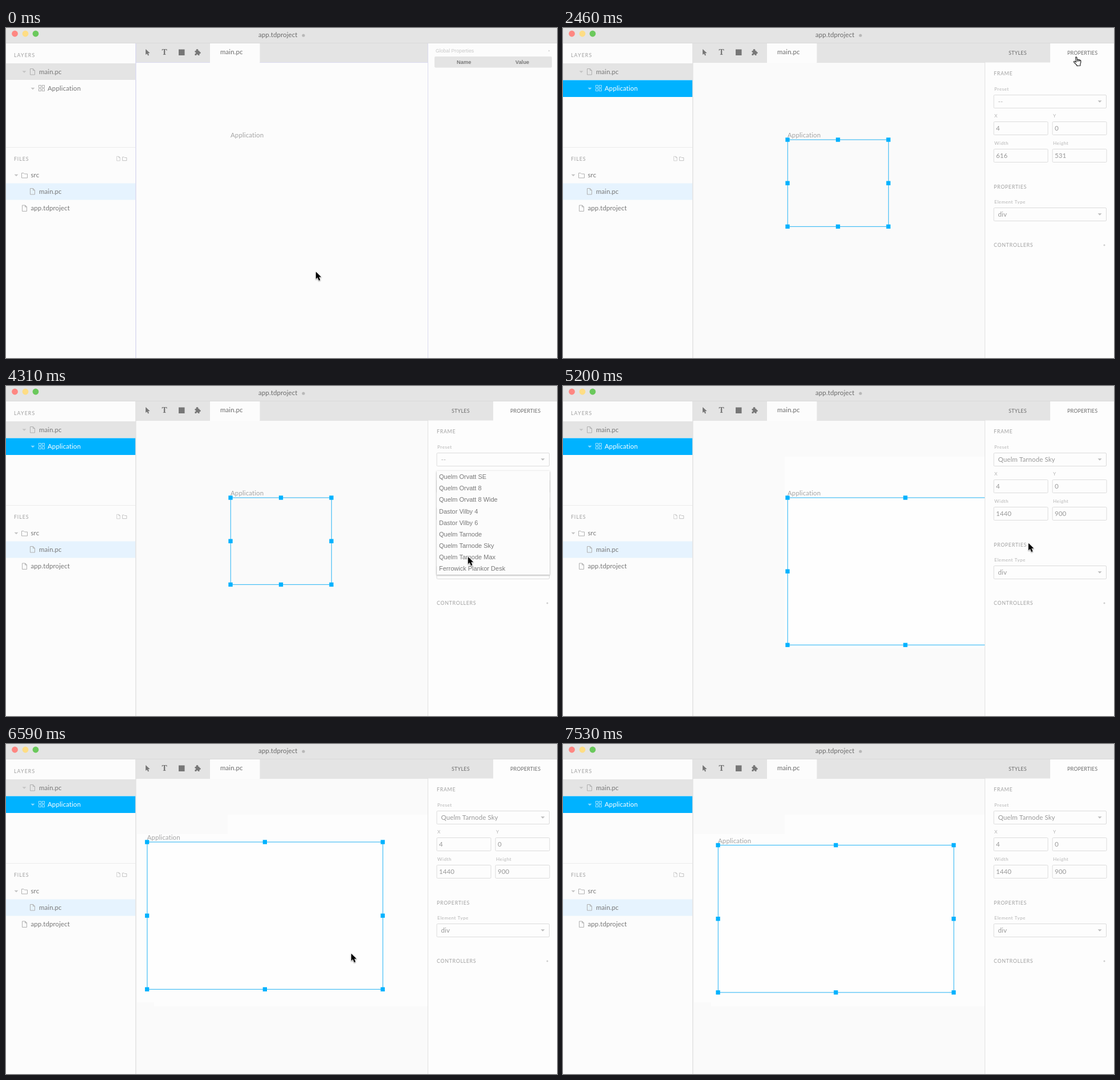
An HTML page with a canvas that plays this animation: 967 by 579 pixels, repeating every 8.27 s.

```html
<!DOCTYPE html>
<html lang="en">
<head>
<meta charset="utf-8">
<title>Frame presets</title>
<style>
  html, body { margin: 0; width: 100%; height: 100%; overflow: hidden; background: #fcfcfc; }
  canvas { display: block; }
</style>
</head>
<body>
<canvas id="stage" width="967" height="579"></canvas>
<script>
const ctx = document.getElementById('stage').getContext('2d');
const LOOP = 8270, BLUE = '#00b2ff', GREY = '#e4e4e4', INK = '#777', PALE = '#b4b4b4';
const SELECT = 1070, PROPERTIES = 2370, OPEN = 3240, CHOOSE = 5200, PAN = 6030, SETTLE = 6890, HIDE = 7530;
const LATO = 'Lato, sans-serif', ARIAL = '"Liberation Sans", Arial, sans-serif';
const presets = ['Quelm Orvatt SE', 'Quelm Orvatt 8', 'Quelm Orvatt 8 Wide', 'Dastor Vilby 4', 'Dastor Vilby 6',
  'Quelm Tarnode', 'Quelm Tarnode Sky', 'Quelm Tarnode Max', 'Ferrowick Plankor Desk'];

// Pointer moves: first step, last step, number of steps, destination.
const moves = [
  [240, 590, 5, 521, 277], [1340, 1340, 1, 566, 245], [1480, 1840, 5, 890, 58],
  [2110, 2200, 2, 895, 51], [2760, 3120, 5, 841, 130], [3600, 3600, 1, 835, 147],
  [3690, 4310, 8, 810, 300], [4670, 4930, 4, 816, 276], [5560, 5560, 1, 834, 286],
  [5660, 5750, 2, 650, 389], [5850, 5850, 1, 605, 368], [7410, 7410, 1, 635, 399]
];
const panPath = [[-18, -1], [-55, -3], [-95, -4], [-130, -6], [-155, -13], [-160, -20], [-146.5, -24], [-122, -14], [-104, 0]];

function stepsDone(t, first, last, count) {
  if (t < first) return 0;
  if (t >= last) return count;
  return Math.floor((t - first) / (last - first) * (count - 1)) + 1;
}

function pointerAt(t) {
  let x = 543, y = 428;
  for (const [first, last, count, toX, toY] of moves) {
    const p = stepsDone(t, first, last, count) / count, eased = p * p * (3 - 2 * p);
    x += (toX - x) * eased;
    y += (toY - y) * eased;
    if (p < 1) break;
  }
  return [x, y];
}

function panAt(t) {
  const done = stepsDone(t, PAN, 6770, panPath.length);
  if (!done) return [0, 0];
  const [x, y] = panPath[done - 1], p = stepsDone(t, SETTLE, 7230, 4) / 4;
  return [x + (-122 - x) * p, y + (-18.5 - y) * p];
}

function fill(x, y, w, h, color) {
  ctx.fillStyle = color;
  ctx.fillRect(x, y, w, h);
}

function text(s, x, y, color = INK, size = 11.5, spacing = 0.1, font = LATO, weight = 400) {
  ctx.font = `${weight} ${size}px ${font}`;
  ctx.letterSpacing = spacing + 'px';
  ctx.fillStyle = color;
  ctx.fillText(s, x, y + size * 0.34);
}

const heading = (s, x, y, spacing = 0.7) => text(s, x, y, '#a0a0a0', 8.8, spacing);
const label = (s, x, y) => text(s, x, y, PALE, 8.2, 0.5);

function polygon(points, x, y, color, outline) {
  ctx.save();
  ctx.translate(x, y);
  ctx.beginPath();
  points.forEach(p => ctx.lineTo(...p));
  ctx.closePath();
  if (outline) { ctx.strokeStyle = outline; ctx.stroke(); }
  if (color) { ctx.fillStyle = color; ctx.fill(); }
  ctx.restore();
}

function disc(x, y, r, color) {
  ctx.fillStyle = color;
  ctx.beginPath();
  ctx.arc(x, y, r, 0, 7);
  ctx.fill();
}

const chevron = (x, y, color = '#c4c4c4', w = 3.5) => polygon([[-w, -w / 2], [w, -w / 2], [0, w / 2]], x, y, color);

function plus(x, y, r, color) {
  fill(x - r, y - 0.5, 2 * r, 1, color);
  fill(x - 0.5, y - r, 1, 2 * r, color);
}

function fileIcon(x, y, scale = 1, color = '#b0b0b0') {
  ctx.save();
  ctx.translate(x, y);
  ctx.scale(scale, scale);
  polygon([[0, 0], [5, 0], [8, 3], [8, 10.5], [0, 10.5]], 0.5, 0.5, null, color);
  polygon([[5, 0], [5, 3], [8, 3]], 0.5, 0.5, null, color);
  ctx.restore();
}

function folderIcon(x, y, scale = 1) {
  ctx.save();
  ctx.translate(x, y);
  ctx.scale(scale, scale);
  polygon([[0, 0], [3.5, 0], [5, 1.5], [10, 1.5], [10, 8.5], [0, 8.5]], 0.5, 0.5, null, '#b0b0b0');
  ctx.restore();
}

function field(x, y, w, value, isSelect, color = '#999') {
  ctx.strokeStyle = '#dcdcdc';
  ctx.beginPath();
  ctx.roundRect(x + 0.5, y + 0.5, w - 1, 23, 1.5);
  ctx.stroke();
  text(value, x + (isSelect ? 8 : 4.5), y + 12, color);
  if (isSelect) chevron(x + w - 12, y + 12, '#bcbcbc');
}

function pair(left, right, y, leftValue, rightValue, isSelect, color) {
  label(left, 757, y);
  label(right, 860, y);
  field(755.5, y + 9.5, 96, leftValue, isSelect, color);
  field(858.5, y + 9.5, 96, rightValue, isSelect, color);
}

function wideSelect(name, y, value, color) {
  label(name, 757, y);
  field(755.5, y + 9.5, 198.5, value, true, color);
}

function drawSidebar(t) {
  const selected = t >= SELECT, line = selected ? '#9be0ff' : '#b0b0b0';
  fill(0, 27, 228, 552, '#fcfcfc');
  heading('LAYERS', 14, 48, 1.1);
  fill(0, 62, 227, 29, GREY);
  chevron(32, 77);
  fileIcon(42, 71);
  text('main.pc', 58, 77);

  if (selected) fill(0, 91.5, 227, 29.5, BLUE);
  else if (t >= 420) fill(0, 91.5, 227, 29.5, GREY);
  chevron(47, 106.5, selected ? '#8adcff' : '#c4c4c4');
  ctx.strokeStyle = line;
  for (const [x, y] of [[57.5, 100.5], [63.5, 100.5], [57.5, 106.5], [63.5, 106.5]]) ctx.strokeRect(x, y, 4, 4);
  text('Application', 73, 106, selected ? '#fff' : INK);

  fill(0, 209, 228, 1, '#ececec');
  heading('FILES', 14, 230, 0.9);
  fileIcon(194, 225, 0.72, '#c0c0c0');
  folderIcon(204, 226, 0.74);
  chevron(18, 258.5);
  folderIcon(27, 254);
  text('src', 43.5, 258);
  fill(0, 272.5, 227, 29, '#e6f3fe');
  fileIcon(42, 281);
  text('main.pc', 58, 287);
  fileIcon(28, 310.5);
  text('app.tdproject', 43.5, 316.5);
}

function drawToolbar(t) {
  fill(0, 0, 967, 27, GREY);
  fill(0, 26, 967, 1, '#dadada');
  disc(15.5, 10, 5.4, '#fe8782');
  disc(34, 10, 5.4, '#fedd85');
  disc(52, 10, 5.4, '#6bc95c');
  text('app.tdproject', 443, 12.5, '#6c6c6c');
  disc(522, 13, 2.6, '#b8b8b8');

  fill(228, 27, 512, 34, GREY);
  polygon([[0, 0], [0, 10], [2.4, 8], [4.2, 11.5], [6, 10.6], [4.4, 7.2], [7.6, 7]], 245, 37, INK);
  text('T', 273.5, 42.5, INK, 14, 0, '"Noto Serif", serif', 700);
  fill(303, 37.5, 10.5, 10.5, INK);
  fill(331.5, 40, 8, 8, INK);
  disc(335.5, 39, 2.1, INK);
  disc(340, 43.5, 1.7, INK);
  disc(332, 43.8, 1.3, GREY);
  disc(335.5, 47.6, 1.3, GREY);
  fill(358, 27, 87.5, 34, '#fcfcfc');
  text('main.pc', 376, 42.5, '#6c6c6c');
  const edge = t < PROPERTIES ? '#dadaf0' : '#e2e2e2';
  fill(227, 27, 1.5, 552, edge);
  fill(228, 60, 130, 1, edge);
  fill(445.5, 60, 295, 1, edge);
  fill(740, 27, 1, 552, edge);
}

function drawArtboard(t) {
  const [dx, dy] = panAt(t), x = 394 + dx, y = 196 + dy;
  const [w, h] = t < CHOOSE ? [177, 152.4] : [413.6, 258.4];
  ctx.save();
  ctx.beginPath();
  ctx.rect(228, 61, 512, 518);
  ctx.clip();
  fill(228, 61, 512, 518, t < PROPERTIES ? '#fcfcfc' : '#fafafa');
  if (t >= CHOOSE) fill(389, 124, 351, 336, '#fdfdfd');
  if (t >= 6300) fill(260, 158, 129, 302, '#fdfdfd');
  if (t >= 6390) fill(230, 158, 30, 295, '#fdfdfd');
  if (t >= CHOOSE) fill(x, y, w, h, '#fefefe');
  text('Application', x, y - 7.5, '#a4a4a4');
  if (t >= 420) {
    ctx.strokeStyle = '#35b9f5';
    ctx.lineWidth = 1.1;
    ctx.strokeRect(x + 0.3, y, w, h);
    ctx.lineWidth = 1;
  }
  if (t >= SELECT) {
    for (const i of [0, 0.5, 1]) for (const j of [0, 0.5, 1])
      if (i !== 0.5 || j !== 0.5) fill(x + i * w - 3.6, y + j * h - 3.7, 7.3, 7.4, BLUE);
  }
  ctx.restore();
}

function drawGlobals() {
  text('Global Properties', 754, 40.5, '#c8c8c8', 8.7, 0, ARIAL);
  plus(953, 40, 1.2, '#d0d0d0');
  ctx.fillStyle = GREY;
  ctx.beginPath();
  ctx.roundRect(752, 50, 206, 19.5, 2);
  ctx.fill();
  text('Name', 791, 60, INK, 9.3, 0, ARIAL, 700);
  text('Value', 894, 60, INK, 9.3, 0, ARIAL, 700);
}

function drawStyles() {
  label('Style', 754, 73.5);
  plus(953.5, 76.5, 2.7, '#777');
  field(752, 89.5, 206, '--', true, PALE);
  fill(741, 121, 226, 1, '#efefef');
  heading('INSTANCE', 756, 141.5);
  heading('MIXINS', 756, 182.5);
  plus(949.5, 182.5, 2.5, '#bbb');
  heading('LAYOUT', 756, 223);
  wideSelect('Display', 249, '--', PALE);
  wideSelect('Position', 295.5, '--', PALE);
  pair('Left', 'Top', 342, '0px', '0px', false, '#d4d4d4');
  pair('Width', 'Height', 388.5, 'auto', 'auto', false, '#d4d4d4');
  heading('TYPOGRAPHY', 756, 463.5);
  wideSelect('Font Family', 489.5, '--', PALE);
  pair('Weight', 'Decoration', 536, '--', '--', true, PALE);
}

function drawProperties(t) {
  const chosen = t >= CHOOSE;
  heading('FRAME', 756, 80.5);
  wideSelect('Preset', 107.5, chosen ? presets[6] : '--', chosen ? '#999' : PALE);
  pair('X', 'Y', 154.5, '4', '0');
  pair('Width', 'Height', 202.5, chosen ? '1440' : '616', chosen ? '900' : '531');
  heading('PROPERTIES', 756, 279);
  wideSelect('Element Type', 305.5, 'div');
  heading('CONTROLLERS', 756, 381.5);
  plus(950, 381, 1.5, '#bbb');
  if (t < OPEN || chosen) return;
  ctx.save();
  ctx.shadowColor = 'rgba(0,0,0,.35)';
  ctx.shadowBlur = 3;
  ctx.shadowOffsetY = 1;
  fill(756, 149, 198, 182, '#fcfcfc');
  ctx.restore();
  presets.forEach((name, i) => text(name, 760, 159.5 + i * 20.1, '#777', 11, 0, ARIAL));
}

function drawPanel(t) {
  fill(741, 27, 226, 552, t < PROPERTIES ? '#fcfcfc' : '#fdfdfd');
  if (t < SELECT) return drawGlobals();
  const onStyles = t < PROPERTIES;
  fill(onStyles ? 855 : 740, 27, onStyles ? 112 : 115, 33.5, GREY);
  text('STYLES', 782, 44, '#6c6c6c', 9, 0.2);
  text('PROPERTIES', 885, 44, '#6c6c6c', 9, 0.1);
  if (onStyles) drawStyles();
  else drawProperties(t);
}

function drawPointer(t) {
  if (t >= HIDE) return;
  const [x, y] = pointerAt(t);
  ctx.save();
  ctx.lineJoin = 'round';
  if (t >= 2110 && t < 2850) {
    ctx.translate(x, y - 0.5);
    ctx.fillStyle = '#fff';
    ctx.strokeStyle = '#111';
    ctx.lineWidth = 1.1;
    const hand = 'M4.6 10V2.2Q4.4.6 5.6.7Q6.7.8 6.8 2.4L7 6Q8.5 4.8 9.2 6.3Q10.5 5.4 11.2 6.8' +
      'Q13.2 6.4 13.2 8.6Q13.2 12 11.6 14V16.5H5.6V15Q3.4 13 1 9.8Q.3 8.5 1.4 8Q2.6 7.6 4.6 10Z';
    const shape = new Path2D(hand);
    ctx.rotate(-0.08);
    ctx.fill(shape);
    ctx.stroke(shape);
    ctx.stroke(new Path2D('M7 6V9M9.2 6.5V9M11.2 7V9'));
  } else {
    ctx.shadowColor = 'rgba(0,0,0,.3)';
    ctx.shadowBlur = 2;
    ctx.shadowOffsetY = 1;
    ctx.lineWidth = 1.6;
    polygon([[0, 0], [0, 12.6], [2.9, 9.9], [5.2, 15.2], [7.5, 14.2], [5.2, 9.1], [9.2, 9]], x + 0.9, y - 0.3, '#000', '#fff');
  }
  ctx.restore();
}

const start = performance.now();
function frame() {
  const t = (performance.now() - start) % LOOP;
  drawSidebar(t);
  drawArtboard(t);
  drawToolbar(t);
  drawPanel(t);
  drawPointer(t);
  requestAnimationFrame(frame);
}
frame();
</script>
</body>
</html>
```
